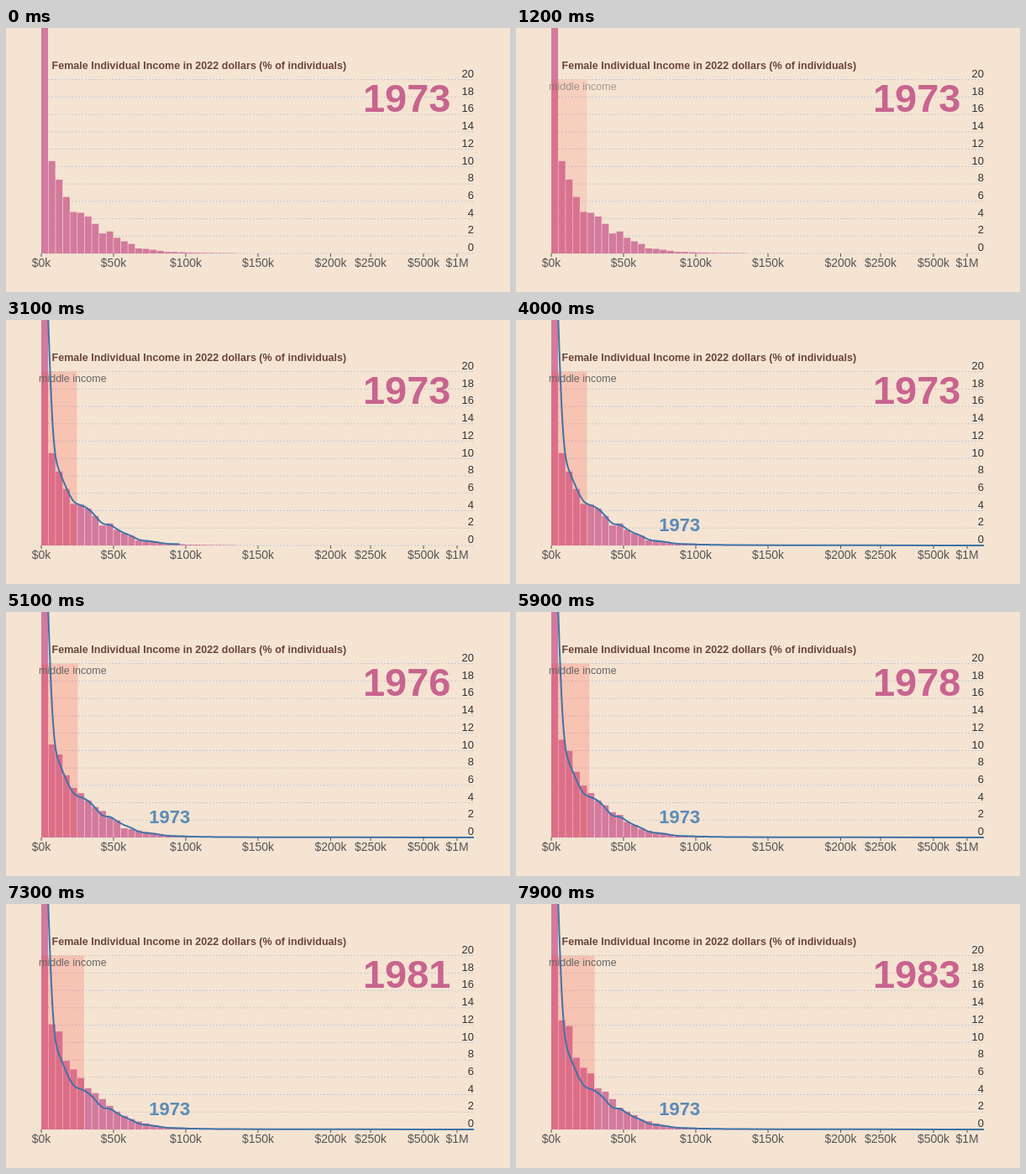
An HTML page for the animation above (8000 ms loop, 600 px wide and 315 px high).

```html
<!DOCTYPE html>
<html lang="en">
<head>
<meta charset="utf-8">
<title>Income distribution</title>
<style>
  html, body { margin: 0; width: 100%; height: 100%; overflow: hidden; background: #f5e4d2; }
  svg { display: block; width: 600px; height: 315px; font-family: "Liberation Sans", Arial, sans-serif; }
</style>
</head>
<body>
<svg id="chart" viewBox="0 0 600 315"></svg>
<script>
const LOOP = 8000, LEFT = 42, RIGHT = 557, BASE = 269, UNIT = 10.37, BIN = 8.62, BINS = 27;
const TALL = 38.5; // first bin, runs off the top of the stage

// Share of people per $5k bin, from the second bin on, and right edge of the middle income band.
const KEYS = [
  { at: 4150, edge: 84.5, share: [10.63, 8.5, 6.5, 4.78, 4.68, 4.25, 3.4, 2.3, 2.53, 1.8, 1.4, 1.1, .58, .53, .43, .3, .18, .17, .14] },
  { at: 5100, edge: 85.5, share: [10.7, 9.55, 7.15, 5.7, 5.1, 4.25, 3.5, 3.05, 2.3, 1.95, 1.05, .95, .8, .62, .5, .4, .3, .2, .15] },
  { at: 5900, edge: 87.3, share: [11.25, 9.95, 7.55, 5.95, 5.1, 4.25, 3.7, 2.9, 2.6, 1.8, 1.45, 1, .78, .58, .5, .35, .25, .2, .15] },
  { at: 6800, edge: 92.3, share: [11.7, 10.75, 7.6, 6.75, 5.45, 4.75, 4.05, 3.5, 2.9, 2.05, 1.5, 1.25, .9, .7, .45, .35, .25, .2, .15] },
  { at: 7900, edge: 93.7, share: [12.55, 11.9, 8.25, 7.1, 6.45, 4.75, 4.35, 3.5, 2.5, 2.05, 1.65, 1.1, .95, .7, .45, .35, .3, .2, .18] }
];

const chart = document.getElementById("chart");

function add(tag, attrs, text = "") {
  const node = document.createElementNS("http://www.w3.org/2000/svg", tag);
  for (const name in attrs) node.setAttribute(name, attrs[name]);
  node.textContent = text;
  return chart.appendChild(node);
}

const label = (text, x, y, size, fill, more = {}) =>
  add("text", { x, y, "font-size": size, fill, ...more }, text);

const clamp = v => Math.max(0, Math.min(1, v));
const progress = (t, from, to) => clamp((t - from) / (to - from));
const mix = (a, b, p) => a + (b - a) * p;
const shareOf = (key, i) => i === 0 ? TALL : key.share[i - 1] ?? .1 * Math.exp((20 - i) / 6);

// Uniform cubic B-spline with clamped ends, as Bezier segments.
function spline(points) {
  const first = points[0], last = points[points.length - 1];
  const p = [first, first, ...points, last, last];
  const blend = (a, b, c, wa, wb, wc) =>
    [0, 1].map(k => ((a[k] * wa + b[k] * wb + c[k] * wc) / (wa + wb + wc)).toFixed(2)).join(" ");
  let d = `M${first.join(" ")}`;
  for (let i = 0; i + 3 < p.length; i++) {
    const [, b, c, e] = p.slice(i, i + 4);
    d += `C${blend(b, c, e, 2, 1, 0)} ${blend(b, c, e, 1, 2, 0)} ${blend(b, c, e, 1, 4, 1)}`;
  }
  return d;
}

// Grid and axes
const middle = { "text-anchor": "middle" }, end = { "text-anchor": "end" }, bold = { "font-weight": "bold" };
for (let v = 0; v <= 20; v += 2) {
  const y = BASE - v * UNIT;
  add("path", { d: `M${LEFT} ${y}H${RIGHT}`, stroke: "#c3cacd", "stroke-dasharray": "2 2" });
  label(v, RIGHT, y - 2.8, 13, "#333", end);
}
const ticks = { $0k: 42, $50k: 128, $100k: 214, $150k: 300, $200k: 386.5, $250k: 434, $500k: 497, $1M: 537 };
for (const [text, x] of Object.entries(ticks)) {
  add("path", { d: `M${x} ${BASE}v4`, stroke: "#555" });
  label(text, x, 285, 14, "#555", middle);
}

// Moving parts, back to front
const bars = Array.from({ length: BINS }, (_, i) =>
  add("rect", { x: LEFT + i * BIN, width: BIN - .6, fill: "#d37a9d" }));
const band = add("rect", { x: LEFT, y: 61.6, height: BASE - 61.6, fill: "rgb(255,62,55)" });
const bandLabel = label("middle income", 39, 74, 12.5, "#666");

const outline = Array.from({ length: BINS }, (_, i) =>
  [LEFT + (i + .5) * BIN, BASE - shareOf(KEYS[0], i) * UNIT]);
const curve = add("path", {
  d: spline([...outline, [RIGHT, BASE]]), fill: "none", stroke: "#3f73a8", "stroke-width": 2,
  pathLength: 1, "stroke-dasharray": "1 2"
});
const curveLabel = label("1973", 194.7, 252, 22, "#5b8bb8", { ...middle, ...bold });
label("Female Individual Income in 2022 dollars (% of individuals)", 54.5, 49, 12.55, "#6b4538", bold);
const year = label("", 477.2, 100, 47, "#c8648f", { ...middle, ...bold });

function draw(t) {
  const next = Math.max(1, KEYS.findIndex(key => key.at >= t));
  const to = KEYS[t > KEYS.at(-1).at ? KEYS.length - 1 : next];
  const from = KEYS[KEYS.indexOf(to) - 1];
  const p = progress(t, from.at, to.at);

  bars.forEach((bar, i) => {
    const height = mix(shareOf(from, i), shareOf(to, i), p) * UNIT;
    bar.setAttribute("y", BASE - height);
    bar.setAttribute("height", height);
  });

  const shown = progress(t, 600, 1600);
  band.setAttribute("width", mix(from.edge, to.edge, p) - LEFT);
  band.setAttribute("opacity", .2 * shown);
  bandLabel.setAttribute("opacity", shown);

  const drawn = progress(t, 2400, 3600);
  curve.setAttribute("stroke-dashoffset", 1 - drawn);
  curve.setAttribute("visibility", drawn > 0 ? "visible" : "hidden");
  curveLabel.setAttribute("opacity", progress(t, 3400, 3900));

  year.textContent = 1973 + Math.max(0, Math.floor((t - 3850) / 400));
}

const start = performance.now();
function frame() {
  draw((performance.now() - start) % LOOP);
  requestAnimationFrame(frame);
}
frame();
</script>
</body>
</html>
```
